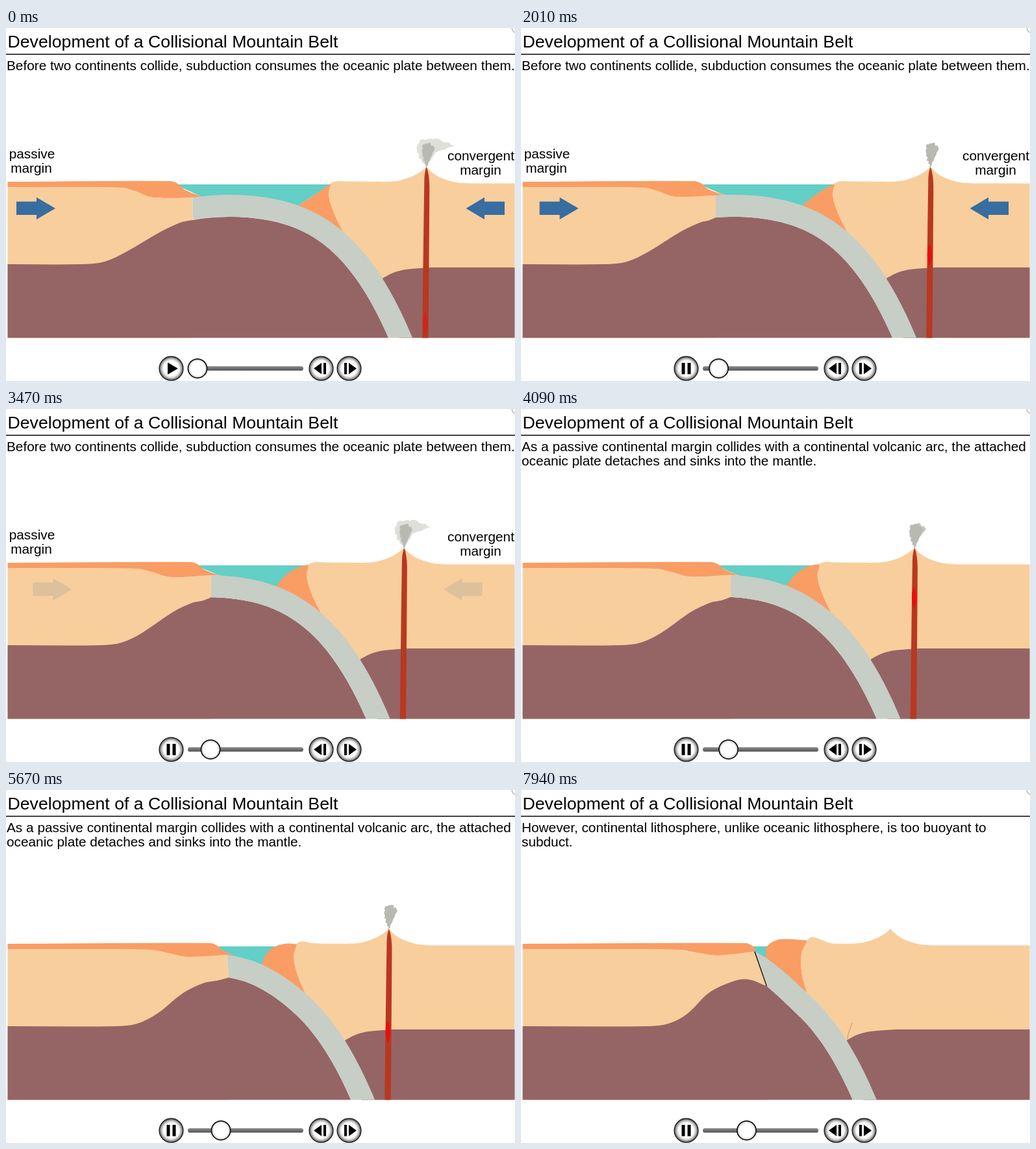
Recreate the animation shown at these times as an HTML page. Size 784 by 544 pixels, loop 8 s.

```html
<!DOCTYPE html>
<html lang="en">
<head>
<meta charset="utf-8">
<title>Development of a Collisional Mountain Belt</title>
<style>
  html, body { margin: 0; width: 100%; height: 100%; overflow: hidden; background: #fff; }
  svg { display: block; width: 100vw; height: 100vh; }
  text { font-family: "Liberation Sans", Arial, sans-serif; font-size: 20.8px; fill: #000; }
  .mid { text-anchor: middle; }
</style>
</head>
<body>
<svg viewBox="0 0 784 544" xmlns="http://www.w3.org/2000/svg">
  <defs>
    <radialGradient id="btn">
      <stop offset="0" stop-color="#fff"/><stop offset=".62" stop-color="#fff"/>
      <stop offset=".76" stop-color="#d8d8d8"/><stop offset=".9" stop-color="#8c8c8c"/>
      <stop offset="1" stop-color="#444"/>
    </radialGradient>
    <radialGradient id="ball">
      <stop offset="0" stop-color="#fff"/><stop offset=".72" stop-color="#fff"/>
      <stop offset="1" stop-color="#c4c4c4"/>
    </radialGradient>
    <linearGradient id="bar" x2="0" y2="1">
      <stop offset="0" stop-color="#8a8a8a"/><stop offset="1" stop-color="#555"/>
    </linearGradient>
    <clipPath id="stage"><rect x="2.5" y="100" width="781" height="377.4"/></clipPath>
  </defs>
  <rect width="784" height="544" fill="#fff"/>
  <path d="M779 0Q780 5 784 7" fill="none" stroke="#bbb" stroke-width="1.5"/>
  <text x="2.5" y="30" style="font-size:26.7px">Development of a Collisional Mountain Belt</text>
  <path d="M0 40.5H784" stroke="#000" stroke-width="1.6"/>
  <text id="line1" x="1" y="65"></text>
  <text id="line2" x="1" y="87"></text>

  <g clip-path="url(#stage)">
    <path id="water" fill="#63cfc6"/>
    <path id="crustR" fill="#f8ce9c"/>
    <path id="mantleR" fill="#956565"/>
    <path id="wedge" fill="#f99d64"/>
    <path id="crustL" fill="#f8ce9c"/>
    <path id="mantleL" fill="#956565"/>
    <path id="slab" fill="#c6cec6"/>
    <path id="shelf" fill="#f99d64"/>
    <path id="fault" fill="none" stroke="#000" stroke-width="1.3"/>
    <path id="crack" d="M581 384Q583 370 589 359" fill="none" stroke="#d99a68" stroke-width="1.2"/>
    <g id="volcano">
      <path d="M0 214Q-3 221 -3.4 232Q-5 330 -6.6 478H2.7Q4 330 4.5 244Q4 224 0 214Z" fill="#b83820"/>
      <path id="glow" d="M0 -18Q3.6 -9 3.6 0T0 18Q-3.6 9 -3.6 0T0 -18Z" fill="#ee0c0c"/>
      <g transform="translate(0 214)">
        <path id="cloud"/>
        <path id="plume" fill="#b9b9b3"/>
      </g>
    </g>
  </g>
  <g id="arrows" fill="#376da0">
    <path id="arrowL" d="M16 267.5H47V261L76 278L47 295V288H16Z"/>
    <path id="arrowR" d="M768 267.5H737V261L708.5 278L737 295V288H768Z"/>
  </g>
  <g id="labels" class="mid">
    <text x="40" y="201">passive</text><text x="39" y="223">margin</text>
    <text x="731.5" y="204">convergent</text><text x="731" y="226">margin</text>
  </g>

  <rect x="280" y="521.3" width="178" height="6.8" rx="3.4" fill="url(#bar)"/>
  <circle id="knob" cy="524.7" r="14.6" fill="url(#ball)" stroke="#111" stroke-width="1.7"/>
  <g fill="url(#btn)" stroke="#222" stroke-width="1.4">
    <circle cx="254.5" cy="524.7" r="18.4"/>
    <circle cx="485.5" cy="524.7" r="18.4"/>
    <circle cx="528.5" cy="524.7" r="18.4"/>
  </g>
  <path id="play" d="M249 515.5L265 524.7L249 534Z"/>
  <path id="pause" d="M247.5 516H252.5V533.5H247.5ZM256.5 516H261.5V533.5H256.5Z"/>
  <path d="M486 516V533.5L474 524.7ZM489 516H493V533.5H489Z"/>
  <path d="M528 516V533.5L540 524.7ZM521 516H525V533.5H521Z"/>
</svg>
<script>
const LOOP = 8000, START = 700;
const SLAB = 34;      // slab thickness
const PERIOD = .935;  // seconds per eruption
const $ = id => document.getElementById(id);
const set = (id, k, v) => $(id).setAttribute(k, v);
const show = (id, on) => set(id, "visibility", on ? "visible" : "hidden");
const clamp = v => Math.max(0, Math.min(1, v));
const mix = (a, b, f) => a + (b - a) * f;
const smooth = v => (v = clamp(v)) * v * (3 - 2 * v);

// spline with handles kept to a third of each segment
function spline(p) {
  const dir = i => {
    const a = p[Math.max(0, i - 1)], b = p[Math.min(p.length - 1, i + 1)];
    const n = Math.hypot(b[0] - a[0], b[1] - a[1]) || 1;
    return [(b[0] - a[0]) / n, (b[1] - a[1]) / n];
  };
  let s = `${p[0]}`;
  for (let i = 1; i < p.length; i++) {
    const a = p[i - 1], b = p[i], u = dir(i - 1), v = dir(i);
    const h = Math.hypot(b[0] - a[0], b[1] - a[1]) / 3;
    s += `C${a[0] + u[0] * h},${a[1] + u[1] * h} ${b[0] - v[0] * h},${b[1] - v[1] * h} ${b}`;
  }
  return s;
}
const line = p => p.join("L");
const shape = (id, ...parts) => set(id, "d", "M" + parts.join("L") + "Z");

// d: travel of the right plate in pixels
function drawPlates(d) {
  const r = d / 78, g = r ** 4, lean = 9 * r ** 6;
  const push = .65 * d + .005 * d * d;
  // points carried by each plate; left ones move at their own share of the push
  const left = (...list) => list.map(([x, rate, y, rise = 0]) => [x + rate * push, y - rise * push]);
  const right = (...list) => list.map(([x, y]) => [x - d, y]);

  // the slab bends along one fixed curve and lifts near the end
  const topY = x => {
    const u = x + d - 345;
    return 257 + .0013 * u ** 2 + 1.887e-8 * u ** 4 - 22 * g * smooth((185 - u) / 110);
  };
  const top = x => [x, topY(x)];
  const base = x => {
    const m = topY(x + .5) - topY(x - .5), n = SLAB / Math.hypot(1, m);
    return [x - m * n, topY(x) + n];
  };
  const trace = (f, from) => Array.from({ length: 41 }, (_, i) => f(mix(from, 634 - d, i / 40)));

  const cutTop = 287.5 + push - lean, cutBase = 287.5 + push + lean;
  let lo = 200, hi = 600;
  for (let i = 0; i < 24; i++) {
    const m = (lo + hi) / 2;
    if (base(m)[0] < cutBase) lo = m; else hi = m;
  }
  const upper = trace(top, cutTop), lower = trace(base, lo);
  const joint = upper[0], heel = lower[0];

  const foot = left([0, 0, 364], [118, .95, 364], [152, .92, 360], [185, .87, 345],
    [240, .6, 313], [268, .68, 300, .05], [278, .87, 297.5, .07]);
  const toe = top(cutTop + 13 * (1 - r ** 6));
  const shelfTop = [...left([0, 0, 237], [252, 1.15, 236], [264, 1.12, 239.5], [275, 1.05, 249, .06]), toe];
  const shelfLow = [...left([0, 0, 245], [178, .8, 246], [198, .93, 251], [226, .95, 261, .075]), joint];

  const tip = top(519 - d), snout = top(450 + 5 * g - d);
  const back = [...right([500 + 19 * g, 240 - 8 * g], [497 + 13 * g, 258 - 5 * g], [505 + 6 * g, 285]), tip];
  const front = [snout, ...right([468 - 11 * r, 262 - 20 * r * r], [484 - 13 * r, 251 - 19 * r * r],
    [493 - 5 * r, 245 - 15 * r * r]), back[0]];
  const rim = right([508 + 19 * g, 236.5 - 9.5 * g], [520 + 32 * g, 236.3 - g],
    [565, 236.8], [600, 236], [621, 230.5], [637, 222.5], [647.5, 214]);
  const flank = right([647.5, 214], [656, 222.5], [670, 231], [691, 237.5], [716, 239.6]);

  shape("water", line([[shelfTop[2][0] - 4, 241], [back[0][0], 241], snout, toe]));
  shape("crustR", spline([...back.slice().reverse(), ...rim]), spline(flank),
    line([[784, 239.6], [784, 480], ...right([607, 480], [565, 400], [518, 330])]));
  shape("mantleR", spline(right([581, 385], [597, 377], [617, 372], [655, 369])),
    line([[784, 369], [784, 480], ...right([607, 480], [568, 402])]));
  shape("wedge", spline(back), spline(front));
  shape("crustL", spline(shelfLow), line([heel, [heel[0], 480], [0, 480]]));
  shape("mantleL", spline([...foot, heel]), line(lower), "0,480");
  shape("slab", line(upper), line(lower.reverse()));
  shape("shelf", spline(shelfTop), spline(shelfLow.reverse()));
  set("fault", "d", `M${joint}L${heel}`);
  set("fault", "opacity", clamp((d - 61) / 13));
  set("crack", "transform", `translate(${-d} 0)`);
  set("crack", "opacity", clamp((d - 71) / 4));
}

// matching outlines of a fresh and a drifting puff, from the vent round to the right
const fresh = [[0, 0], [-4, -9], [-7, -22], [-6, -34], [4, -37], [13, -29], [7, -16]];
const drift = [[0, 0], [-14, -14], [-21, -33], [-12, -46], [20, -48], [61, -35], [18, -26]];

function smoke(spread) {
  const p = fresh.map((a, i) => a.map((v, k) => mix(v, drift[i][k], spread)));
  const out = [];
  p.forEach((a, i) => {
    const b = p[(i + 1) % p.length];
    for (let k = 0; k < 6; k++) {
      const bump = k ? Math.sin(i * 7.3 + k * 4.1) * 1.1 : 0;
      out.push([mix(a[0], b[0], k / 6) + bump, mix(a[1], b[1], k / 6) - bump]);
    }
  });
  return "M" + line(out) + "Z";
}

function drawVolcano(t, s, d) {
  const cycle = Math.min(s, 5.85) / PERIOD, p = cycle % 1;
  const spread = clamp(((cycle + .7) % 1 - .25) / .72);
  const grey = mix(185, 223, clamp(spread * 3)), y = 455 - 262 * p;
  set("volcano", "transform", `translate(${647.8 - d} 0)`);
  set("volcano", "opacity", clamp((7150 - t) / 900));
  set("glow", "transform", `translate(${-.4 - (y - 214) / 130} ${y})`);
  set("glow", "opacity", t > 6250 || p > .86 ? 0 : clamp(.4 + p * 3));
  set("cloud", "d", smoke(spread));
  set("cloud", "fill", `rgb(${grey},${grey},${grey - 6})`);
}

const CAPTIONS = [
  ["Before two continents collide, subduction consumes the oceanic plate between them.", ""],
  ["As a passive continental margin collides with a continental volcanic arc, the attached",
   "oceanic plate detaches and sinks into the mantle."],
  ["However, continental lithosphere, unlike oceanic lithosphere, is too buoyant to", "subduct."]
];

function draw(t) {
  const s = Math.max(0, t - START) / 1000;
  const d = 13.44 * s - .362 * s * s;
  drawPlates(d);
  drawVolcano(t, s, d);
  const caption = CAPTIONS[t < 3600 ? 0 : t < 5900 ? 1 : 2];
  ["line1", "line2"].forEach((id, i) => $(id).textContent = caption[i]);
  show("labels", t < 3600);
  set("arrows", "opacity", clamp((3550 - t) / 560));
  set("arrowL", "transform", `translate(${.74 * d} 0)`);
  set("arrowR", "transform", `translate(${-d} 0)`);
  set("knob", "cx", 295 + 7.25 * s);
  show("play", s === 0);
  show("pause", s > 0);
}

set("plume", "d", smoke(0));
const begin = performance.now();
function tick() {
  draw((performance.now() - begin) % LOOP);
  requestAnimationFrame(tick);
}
tick();
</script>
</body>
</html>
```
